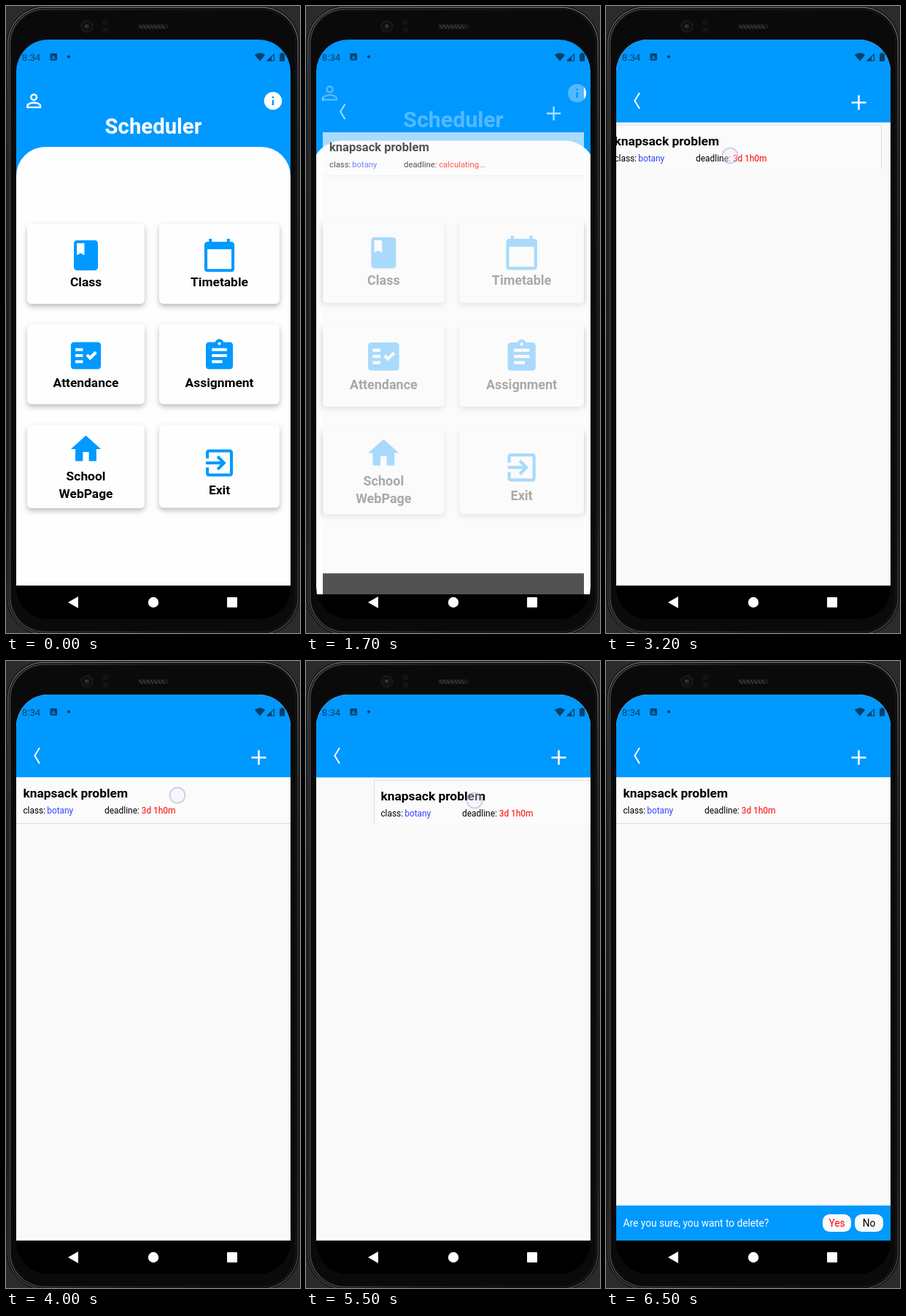
Write an HTML page with a canvas that moves like this. It is 403 by 859 pixels and loops after 8000 ms.

```html
<!DOCTYPE html>
<html lang="en">
<head>
<meta charset="utf-8">
<title>Scheduler</title>
<style>
html, body { margin: 0; width: 100%; height: 100%; overflow: hidden; background: #2b2b2d; }
canvas { display: block; width: 403px; height: 859px; }
</style>
</head>
<body>
<canvas id="stage"></canvas>
<script>
const W = 403, H = 859, LOOP = 8000, STEP = 100;
const BLUE = '#0099ff', DARK = '#06416b', PAPER = '#f9f9f9';
const FONT = 'Roboto, sans-serif';
const SCREEN = { x: 14, y: 46, w: 376, h: 794, nav: 794, cx: 202, cy: 443 };
const ratio = window.devicePixelRatio || 1;

// 24-unit icon outlines
const ICONS = {
  book: 'M18 2H6c-1.1 0-2 .9-2 2v16c0 1.1.9 2 2 2h12c1.1 0 2-.9 2-2V4c0-1.1-.9-2-2-2zM6 4h5v8l-2.5-1.5L6 12V4z',
  calendar: 'M20 3h-1V1h-2v2H7V1H5v2H4c-1.1 0-2 .9-2 2v16c0 1.1.9 2 2 2h16c1.1 0 2-.9 2-2V5c0-1.1-.9-2-2-2zm0 18H4V8h16v13z',
  checklist: 'M20 3H4c-1.1 0-2 .9-2 2v14c0 1.1.9 2 2 2h16c1.1 0 2-.9 2-2V5c0-1.1-.9-2-2-2zM10 17H5v-2h5v2zm0-4H5v-2h5v2zm0-4H5V7h5v2zm4.82 6L12 12.16l1.41-1.41 1.41 1.42L17.99 9l1.42 1.42L14.82 15z',
  clipboard: 'M19 3h-4.18C14.4 1.84 13.3 1 12 1c-1.3 0-2.4.84-2.82 2H5c-1.1 0-2 .9-2 2v14c0 1.1.9 2 2 2h14c1.1 0 2-.9 2-2V5c0-1.1-.9-2-2-2zm-7 0c.55 0 1 .45 1 1s-.45 1-1 1-1-.45-1-1 .45-1 1-1zm2 14H7v-2h7v2zm3-4H7v-2h10v2zm0-4H7V7h10v2z',
  house: 'M10 20v-6h4v6h5v-8h3L12 3 2 12h3v8z',
  exit: 'M10.09 15.59L11.5 17l5-5-5-5-1.41 1.41L12.67 11H3v2h9.67l-2.58 2.59zM19 3H5c-1.11 0-2 .9-2 2v4h2V5h14v14H5v-4H3v4c0 1.1.89 2 2 2h14c1.1 0 2-.9 2-2V5c0-1.1-.9-2-2-2z',
  person: 'M12 5.9c1.16 0 2.1.94 2.1 2.1s-.94 2.1-2.1 2.1S9.9 9.16 9.9 8s.94-2.1 2.1-2.1m0 9c2.97 0 6.1 1.46 6.1 2.1v1.1H5.9V17c0-.64 3.13-2.1 6.1-2.1M12 4C9.79 4 8 5.79 8 8s1.79 4 4 4 4-1.79 4-4-1.79-4-4-4zm0 9c-2.67 0-8 1.34-8 4v3h16v-3c0-2.66-5.33-4-8-4z',
  info: 'M12 2C6.48 2 2 6.48 2 12s4.48 10 10 10 10-4.48 10-10S17.52 2 12 2zm1 15h-2v-6h2v6zm0-8h-2V7h2v2z'
};
for (const name in ICONS) ICONS[name] = new Path2D(ICONS[name]);

// card: x, y, width, height, icon, icon y, label lines with baselines
const CARDS = [
  [29, 298, 161, 110, 'book', 341.6, ['Class', 384.3]],
  [210, 298, 165, 110, 'calendar', 341.6, ['Timetable', 384.3]],
  [29, 435.5, 161, 110, 'checklist', 479, ['Attendance', 522]],
  [210, 435.5, 165, 110, 'clipboard', 479, ['Assignment', 522]],
  [29, 573.5, 161, 114.5, 'house', 607, ['School', 650, 'WebPage', 673.5]],
  [210, 573.5, 165, 114, 'exit', 626, ['Exit', 669]]
];

// finger path and row offset, one value per step
const SWIPES = [
  { start: 2800, y: 205, finger: [250, 246, 232, 204, 170, 130, 95, 70], shift: [0, 0, 0, 0, -12, -45, -70, -25] },
  { start: 4000, y: 184, finger: [235, 222, 180, 120, 58, 14, 12], shift: [0, 0, -25, -87, -40, 0, 0] },
  { start: 4900, y: 191, finger: [150, 151, 154, 165, 182, 204, 231, 250], shift: [0, 0, 2, 12, 30, 52, 79, 40] },
  { start: 5800, y: 193, finger: [130, 140, 168, 230, 300, 345], shift: [0, 8, 36, 98, 168, 80] }
];
const OPEN = { start: 1500, steps: [0.08, 0.36, 0.68, 0.88, 0.97, 1] };

function makeLayer(canvas) {
  canvas.width = W * ratio;
  canvas.height = H * ratio;
  const ctx = canvas.getContext('2d');
  ctx.scale(ratio, ratio);
  return ctx;
}
const stage = makeLayer(document.getElementById('stage'));
const overlay = makeLayer(document.createElement('canvas'));
let g = stage;

function box(x, y, w, h, fill, r = 0) {
  g.fillStyle = fill;
  g.beginPath();
  g.roundRect(x, y, w, h, r);
  g.fill();
}
function disc(x, y, r, fill) {
  g.fillStyle = fill;
  g.beginPath();
  g.arc(x, y, r, 0, Math.PI * 2);
  g.fill();
}
function trace(points, close) {
  g.beginPath();
  points.forEach(([x, y]) => g.lineTo(x, y));
  if (close) g.closePath();
}
function line(points, color, width) {
  trace(points);
  g.strokeStyle = color;
  g.lineWidth = width;
  g.stroke();
}
function poly(points, fill) {
  trace(points, true);
  g.fillStyle = fill;
  g.fill();
}
function text(str, x, y, size, color, weight = 400, align = 'left') {
  g.font = `${weight} ${size}px ${FONT}`;
  g.textAlign = align;
  g.fillStyle = color;
  g.fillText(str, x, y);
}
function icon(name, cx, cy, scale, color) {
  g.save();
  g.translate(cx, cy);
  g.scale(scale, scale);
  g.translate(-12, -12);
  g.fillStyle = color;
  g.fill(ICONS[name], 'evenodd');
  g.restore();
}
function blend(x0, y0, x1, y1, ...colors) {
  const gradient = g.createLinearGradient(x0, y0, x1, y1);
  colors.forEach((color, i) => gradient.addColorStop(i / (colors.length - 1), color));
  return gradient;
}
function clipScreen() {
  g.beginPath();
  g.roundRect(SCREEN.x, SCREEN.y, SCREEN.w, SCREEN.h, 44);
  g.clip();
}
function zoom(s) {
  g.translate(SCREEN.cx, SCREEN.cy);
  g.scale(s, s);
  g.translate(-SCREEN.cx, -SCREEN.cy);
}

// nested outlines: thin light edge, dark groove, soft inner sheen, black face
function drawPhone() {
  box(0, 0, W, H, '#2b2b2d');
  const shell = (inset, fill) =>
    box(1 + inset, inset, 401 - 2 * inset, 862 - 2 * inset, fill, 52 - inset);
  shell(0, '#060607');
  shell(1, blend(0, 0, 0, H, '#6c6d6f', '#3c3c3e', '#323234', '#2c2c2e', '#4c4c4e'));
  shell(2.4, '#050506');
  shell(3.4, blend(0, 0, W, 0, '#3c3d3f', '#1c1c1d', '#151516'));
  shell(5.5, '#0a0a0b');

  disc(111, 28, 9, '#161617');
  disc(111, 28, 5.5, '#0c0c0d');
  disc(111, 28, 3.2, '#242427');
  disc(110, 27, 1.1, '#5a5a60');
  disc(136, 22.5, 4, '#131314');
  disc(136, 33, 4, '#131314');
  box(181, 25, 42, 6.5, '#181819', 3.2);
  for (let x = 185; x < 220; x += 5) line([[x - 2, 26], [x + 2, 31]], '#39393a', 1.5);
}

function drawStatus() {
  text('8:34', 21.8, 75, 13.2, DARK);
  box(60.5, 65, 9.5, 9.5, DARK, 1);
  text('A', 65.2, 72.7, 8, BLUE, 700, 'center');
  disc(86, 69.5, 2.1, DARK);
  g.fillStyle = DARK;
  g.beginPath();
  g.moveTo(348, 75.5);
  g.lineTo(340.8, 67);
  g.quadraticCurveTo(348, 61.6, 355.2, 67);
  g.fill();
  line([[358, 74.8], [367.5, 74.8], [367.5, 66], [358, 74.8]], DARK, 1.2);
  poly([[357, 75.4], [364, 75.4], [364, 69]], DARK);
  box(375, 65.2, 7, 10.6, DARK, 1);
  box(377, 64, 3, 2, DARK);
}

function drawNavButtons() {
  poly([[85, 817], [99, 809], [99, 825]], '#fff');
  disc(202, 817, 7.2, '#fff');
  box(303, 810, 14, 14, '#fff', 1);
}

function drawCard([x, y, w, h, name, iconY, label]) {
  g.save();
  g.shadowColor = 'rgba(0,0,0,.26)';
  g.shadowBlur = 7 * ratio;
  g.shadowOffsetY = 3.5 * ratio;
  box(x, y, w, h, '#fefefe', 6);
  g.restore();
  const cx = x + w / 2;
  icon(name, cx, iconY, 2.06, BLUE);
  for (let i = 0; i < label.length; i += 2) text(label[i], cx, label[i + 1], 17.4, '#000', 700, 'center');
}

function drawHome() {
  box(SCREEN.x, SCREEN.y, SCREEN.w, 250, BLUE);
  box(SCREEN.x, 193, SCREEN.w, SCREEN.nav - 193, '#fefefe', [40, 40, 0, 0]);
  box(SCREEN.x, SCREEN.nav, SCREEN.w, 46, '#000');
  icon('person', 38.2, 130, 1.25, '#fff');
  icon('info', 366, 130, 1.22, '#fff');
  text('Scheduler', 202, 175, 29.3, '#fff', 700, 'center');
  CARDS.forEach(drawCard);
}

function drawRow(shift, ready) {
  const { x, w } = SCREEN;
  g.save();
  g.beginPath();
  g.rect(x, 159.5, w, 63.5);
  g.clip();
  if (shift) {
    g.translate(shift, 4);
    box(x, 159, w, 64, '#fbfbfb', 2);
    g.strokeStyle = '#dedee5';
    g.lineWidth = 1;
    g.strokeRect(x + 0.5, 159.5, w - 1, 64);
  } else {
    box(x, 159, w, 63, '#fbfbfb');
    box(x, 222, w, 1, '#dcdcdc');
  }
  const due = ready ? 135.1 : 130.6;
  text('knapsack problem', 23.4, 187.2, 17.4, '#000', 700);
  text('class:', 23.4, 209.4, 11.9, '#000');
  text('botany', 56.2, 209.4, 11.9, '#3346ff');
  text('deadline:', due, 209.4, 11.9, '#000');
  text(ready ? '3d 1h0m' : 'calculating...', due + 50.6, 209.4, 11.9, '#f00');
  g.restore();
}

function drawList(shift, ready) {
  const { x, y, w, nav } = SCREEN;
  box(x, y, w, nav - y, PAPER);
  box(x, y, w, 113.5, BLUE);
  box(x, 790.5, w, 3.5, '#fff');
  box(x, nav, w, 46, '#000');
  line([[46, 119], [39.4, 129.8], [46, 140.6]], '#fff', 2);
  line([[336.5, 132.3], [356.5, 132.3]], '#fff', 2.5);
  line([[346.5, 122.3], [346.5, 142.3]], '#fff', 2.5);
  drawRow(shift, ready);
}

function drawConfirm() {
  box(SCREEN.x, 746, SCREEN.w, 48, BLUE);
  text('Are you sure, you want to delete?', 23.6, 775.2, 13.72, '#fff');
  [['Yes', 297, '#f00'], ['No', 341, '#000']].forEach(([label, x, color]) => {
    box(x, 758, 39, 24, '#fafafa', 9.5);
    text(label, x + 19.5, 775.2, 13.72, color, 400, 'center');
  });
}

function drawTouch(x, y) {
  disc(x, y, 10.5, 'rgba(240,238,255,.4)');
  g.strokeStyle = 'rgba(110,100,180,.28)';
  g.lineWidth = 2;
  g.beginPath();
  g.arc(x, y, 10.5, 0, Math.PI * 2);
  g.stroke();
}

function drawOpening(p) {
  g = overlay;
  g.clearRect(0, 0, W, H);
  g.save();
  zoom(0.85 + 0.15 * p);
  drawList(0, false);
  g.restore();
  g = stage;
  g.save();
  zoom(1 + 0.05 * p);
  drawHome();
  g.restore();
  g.globalAlpha = p;
  g.drawImage(overlay.canvas, 0, 0, W, H);
  g.globalAlpha = 1;
}

function render(t) {
  const opened = (t - OPEN.start) / STEP;
  const swipe = SWIPES.find(s => t >= s.start && t < s.start + s.finger.length * STEP);
  const step = swipe ? (t - swipe.start) / STEP : 0;

  drawPhone();
  g.save();
  clipScreen();
  if (opened < 0) drawHome();
  else if (opened < OPEN.steps.length - 1) drawOpening(OPEN.steps[opened]);
  else drawList(swipe ? swipe.shift[step] : 0, t >= 2300);
  if (t >= 6400) drawConfirm();
  if (t >= 1300 && t < OPEN.start) drawTouch(305, 501.5);
  if (swipe) drawTouch(swipe.finger[step], swipe.y);
  drawStatus();
  drawNavButtons();
  g.restore();
}

const begin = performance.now();
function tick() {
  const t = (performance.now() - begin) % LOOP;
  render(Math.floor(t / STEP) * STEP);
  requestAnimationFrame(tick);
}
tick();
</script>
</body>
</html>
```
